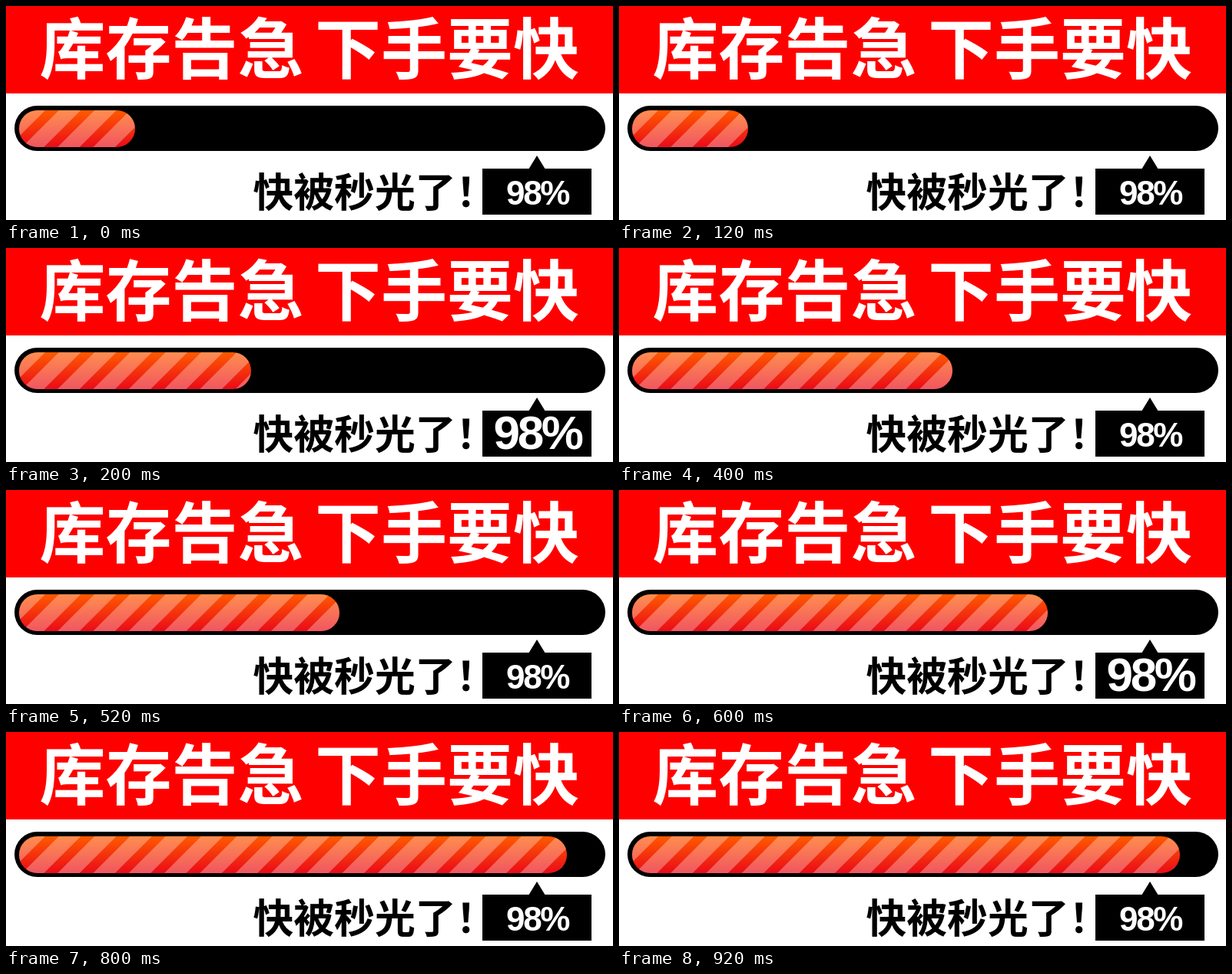
An HTML page with a canvas that plays this animation: 790x279 px, repeating every 1 s.

```html
<!DOCTYPE html>
<html lang="zh-CN">
<head>
<meta charset="utf-8">
<style>
  html, body { margin: 0; width: 100%; height: 100%; overflow: hidden; background: #fff; }
  canvas { display: block; }
</style>
</head>
<body>
<canvas id="stage" width="790" height="279"></canvas>
<script>
const ctx = document.getElementById('stage').getContext('2d');
const CJK = '"Noto Sans CJK SC", "Noto Sans CJK", sans-serif';
const LATIN = '"Liberation Sans", Arial, sans-serif';
const STEP = 200;
const ENDS = [168, 319, 434, 558, 730];
const BAR = { x: 17, y: 136, h: 48 };
const STRIPE = { first: 22.5, pitch: 46.3, width: 28.5 };

function pill(x, y, w, h) {
  ctx.beginPath();
  ctx.roundRect(x, y, w, h, h / 2);
}

function text(str, x, y, size, family, color, { align = 'left', letter = 0, word = 0 } = {}) {
  ctx.font = `bold ${size}px ${family}`;
  ctx.fillStyle = color;
  ctx.textAlign = align;
  ctx.letterSpacing = `${letter}px`;
  ctx.wordSpacing = `${word}px`;
  ctx.fillText(str, x, y);
}

function drawProgress(end) {
  const { x, y, h } = BAR;
  ctx.fillStyle = '#000';
  pill(11, 130, 769, 59);
  ctx.fill();

  ctx.save();
  pill(x, y, end - x, h);
  ctx.clip();
  const shade = ctx.createLinearGradient(0, y, 0, y + h);
  shade.addColorStop(0, '#ff5a00');
  shade.addColorStop(1, '#ea0a18');
  ctx.fillStyle = shade;
  ctx.fillRect(x, y, end - x, h);

  // Diagonal highlights stay put while the fill grows over them.
  ctx.fillStyle = 'rgba(255,255,255,0.31)';
  for (let s = STRIPE.first; s < end + h; s += STRIPE.pitch) {
    const right = s + STRIPE.width;
    ctx.beginPath();
    ctx.moveTo(s, y);
    ctx.lineTo(right, y);
    ctx.lineTo(right - h, y + h);
    ctx.lineTo(s - h, y + h);
    ctx.fill();
  }
  ctx.restore();
}

function drawBadge(size, baseline) {
  ctx.fillStyle = '#000';
  ctx.fillRect(620, 212, 142, 60);
  ctx.beginPath();
  ctx.moveTo(691, 195);
  ctx.lineTo(702, 213);
  ctx.lineTo(680, 213);
  ctx.fill();
  text('98%', 691.5, baseline, size, LATIN, '#fff', { align: 'center', letter: -0.055 * size });
}

function draw(now) {
  const step = Math.floor(now / STEP) % ENDS.length;
  ctx.fillStyle = '#fff';
  ctx.fillRect(0, 0, 790, 279);
  ctx.fillStyle = '#f00';
  ctx.fillRect(0, 0, 790, 114);
  text('库存告急 下手要快', 43.5, 87.5, 86, CJK, '#fff', { word: -5 });
  drawProgress(ENDS[step]);
  text('快被秒光了！', 321.5, 262, 52.8, CJK, '#000');
  if (step % 2) drawBadge(62, 262);
  else drawBadge(44, 258.5);
}

const start = performance.now();
function loop() {
  draw(performance.now() - start);
  requestAnimationFrame(loop);
}
loop();
</script>
</body>
</html>
```
